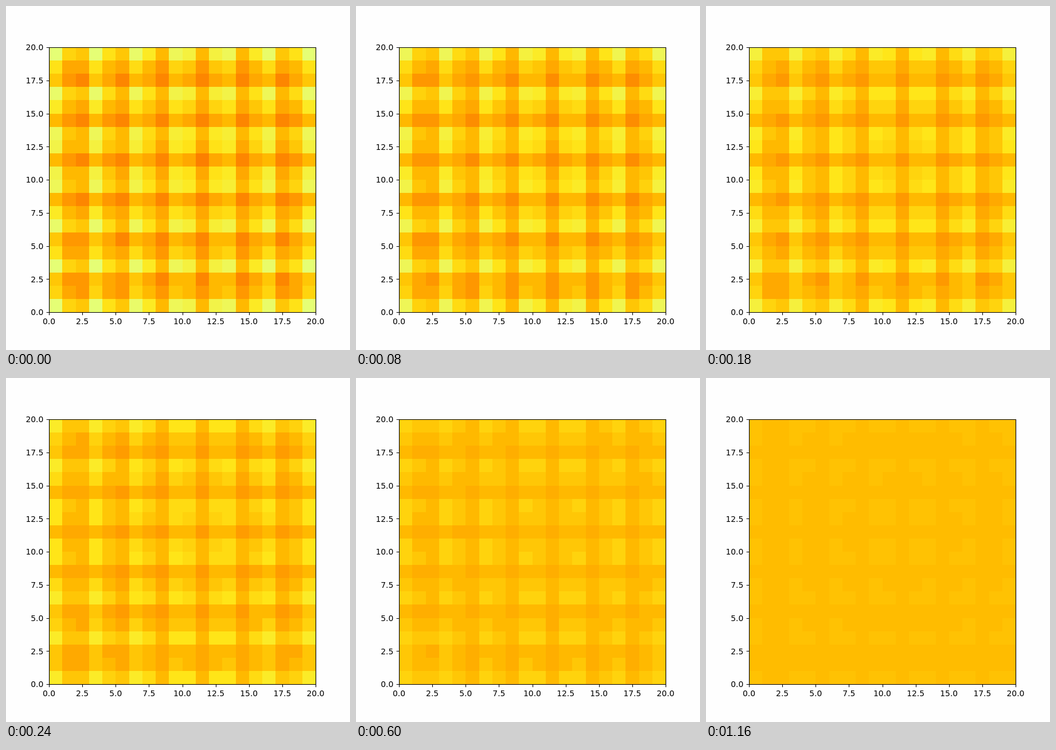
Animation, 600 px wide and 600 px high, one loop 4480 ms. Source, as an HTML page with a canvas:

```html
<!DOCTYPE html>
<html lang="en">
<head>
<meta charset="utf-8">
<title>Fading grid</title>
<style>
  html, body { margin: 0; width: 100%; height: 100%; overflow: hidden; background: #fefefe; }
  canvas, svg { position: absolute; left: 0; top: 0; }
  text { font: 13.89px "DejaVu Sans", sans-serif; }
  path { fill: none; stroke: #000; stroke-width: 1.11; }
</style>
</head>
<body>
<canvas id="grid" width="600" height="600"></canvas>
<svg id="axes" width="600" height="600"></svg>
<script>
const LOOP = 4480, STEP = 20, DECAY = 0.9595, N = 20;
const LEFT = 75, RIGHT = 540, TOP = 72, BOTTOM = 534;
const STOPS = [[228, 255, 122], [255, 232, 26], [255, 189, 0], [255, 160, 0], [252, 127, 0]];

const ctx = document.getElementById('grid').getContext('2d');
const edgeX = i => Math.round(LEFT + (RIGHT - LEFT) * i / N);
const edgeY = i => Math.round(BOTTOM - (BOTTOM - TOP) * i / N);
const wave = i => Math.sin(i) ** 2;

// 256-step colour map
function colour(v) {
  const u = Math.min(255, Math.floor(v * 256)) / 255 * 4;
  const s = Math.min(3, Math.floor(u));
  return STOPS[s].map((c, k) => Math.round(c + (STOPS[s + 1][k] - c) * (u - s)));
}

const key = (c, bits) => c.map(x => x >> bits).join();
const distance = (a, b) => a.reduce((sum, x, k) => sum + (x - b[k]) ** 2, 0);

// Mean colour of each occupied 16-wide RGB box, grouped by 32-wide box
function palette(colours) {
  const boxes = new Map(), groups = new Map();
  for (const c of colours) {
    const id = key(c, 4);
    if (!boxes.has(id)) boxes.set(id, { group: key(c, 5), sum: [0, 0, 0], count: 0 });
    const box = boxes.get(id);
    c.forEach((x, k) => box.sum[k] += x);
    box.count++;
  }
  for (const { group, sum, count } of boxes.values()) {
    if (!groups.has(group)) groups.set(group, []);
    groups.get(group).push(sum.map(x => Math.round(x / count)));
  }
  return groups;
}

function drawGrid(step) {
  const fade = DECAY ** step;
  const colours = Array.from({ length: N * N }, (_, i) => {
    const start = (wave(i % N) + wave(Math.floor(i / N))) / 2;
    return colour(0.5 + (start - 0.5) * fade);
  });
  const groups = palette(colours);
  colours.forEach((c, i) => {
    const near = groups.get(key(c, 5))
      .reduce((a, b) => distance(c, b) < distance(c, a) ? b : a);
    const x = i % N, y = Math.floor(i / N);
    ctx.fillStyle = `rgb(${near})`;
    ctx.fillRect(edgeX(x), edgeY(y + 1), edgeX(x + 1) - edgeX(x), edgeY(y) - edgeY(y + 1));
  });
}

function drawAxes() {
  let lines = `M${LEFT + .5} ${TOP + .5}H${RIGHT + .5}V${BOTTOM + .5}H${LEFT + .5}Z`;
  let labels = '';
  for (let i = 0; i <= 8; i++) {
    const x = LEFT + (RIGHT - LEFT) * i / 8, y = BOTTOM - (BOTTOM - TOP) * i / 8;
    const label = (i * 2.5).toFixed(1);
    lines += `M${Math.round(x) + .5} ${BOTTOM + .5}v4.86M${LEFT + .5} ${Math.round(y) + .5}h-4.86`;
    labels += `<text x="${x}" y="555" text-anchor="middle">${label}</text>`
            + `<text x="65.3" y="${Math.round(y + 5.3)}" text-anchor="end">${label}</text>`;
  }
  document.getElementById('axes').innerHTML = `<path d="${lines}"/>${labels}`;
}

const begin = performance.now();
let shown = -1;
function tick() {
  const step = Math.floor((performance.now() - begin) % LOOP / STEP);
  if (step !== shown) drawGrid(shown = step);
  requestAnimationFrame(tick);
}
drawAxes();
tick();
</script>
</body>
</html>
```
